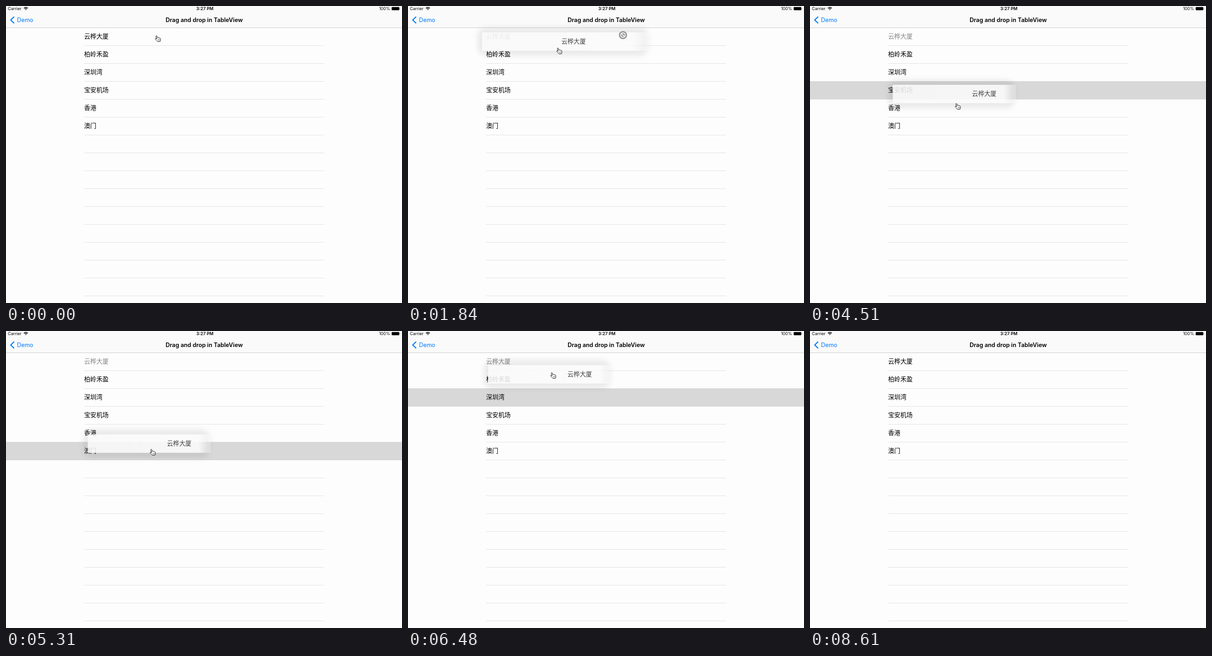
An HTML page for the animation above (8880 ms loop, 864 by 648 pixels).

```html
<!DOCTYPE html>
<html lang="zh-CN">
<head>
<meta charset="utf-8">
<title>Drag and drop in TableView</title>
<style>
  html, body { margin: 0; width: 100%; height: 100%; overflow: hidden; background: #fdfdfd; }
  svg { display: block; width: 864px; height: 648px; }
  text { font-family: Inter, sans-serif; font-size: 12.75px; }
  .status { font-size: 9.1px; }
  .cell { font-family: 'Noto Sans CJK SC', 'Noto Sans CJK', sans-serif; font-size: 13.33px; }
</style>
</head>
<body>
<svg viewBox="0 0 864 648">
  <defs>
    <linearGradient id="fade">
      <stop offset="0" stop-color="#fcfcfc" stop-opacity=".86"/>
      <stop offset=".9" stop-color="#fefefe" stop-opacity=".86"/>
      <stop offset="1" stop-color="#fefefe" stop-opacity=".25"/>
    </linearGradient>
    <filter id="blur" x="-40" y="-40" width="800" height="120" filterUnits="userSpaceOnUse">
      <feGaussianBlur stdDeviation="6"/>
    </filter>
  </defs>

  <rect width="864" height="47" fill="#fafafa"/>
  <rect y="47" width="864" height="1" fill="#cbcbcb"/>
  <text class="status" x="4" y="9">Carrier</text>
  <g fill="none" stroke="#000" stroke-width="1.4">
    <path d="M38.9 4.8a6.2 6.2 0 0 1 8.8 0M40.7 6.5a3.7 3.7 0 0 1 5.2 0"/>
    <path d="M43.3 9.2l-1.2-1.4a1.8 1.8 0 0 1 2.4 0z" fill="#000" stroke="none"/>
  </g>
  <text class="status" x="434" y="9" text-anchor="middle" font-weight="600" style="font-size:9.4px">3:27 PM</text>
  <text class="status" x="838" y="9" text-anchor="end">100%</text>
  <rect x="841.5" y="2.3" width="16.6" height="7" rx="1.4"/>
  <path d="M859 4.4q1.3 1.4 0 2.8z"/>
  <path d="M17.8 23.2L10.4 30.5l7.4 7.3" fill="none" stroke="#007aff" stroke-width="2.3"/>
  <text x="24" y="35" fill="#007aff">Demo</text>
  <text x="432.5" y="35" text-anchor="middle" font-weight="600">Drag and drop in TableView</text>

  <g id="lines" fill="#e1e1e1"></g>
  <rect id="mark" width="864" height="40" fill="#d8d8d8"/>
  <g id="cells"></g>

  <g id="card">
    <rect id="shade" x="-10" y="-11" height="62" rx="20" fill-opacity=".075" filter="url(#blur)"/>
    <rect id="plate" height="40" fill="url(#fade)"/>
    <text id="label" class="cell" y="24.5" fill="#444"></text>
  </g>
  <g id="badge">
    <circle r="9" fill="#9a9a9a"/>
    <g fill="none" stroke="#fff" stroke-width="1.6">
      <circle r="5"/>
      <path d="M-3.5-3.5L3.5 3.5"/>
    </g>
  </g>
  <g id="hand" stroke="#000" stroke-linejoin="round">
    <path fill="#fff" d="M-1.9 1L-3.9-4.3C-4.5-6.4-2.3-6.9-1.7-5.2L-.4-1.6C.4-2.6 1.8-2.4 2.1-1.4 3-2.2 4.2-1.8 4.4-.7 5.4-1 6-.1 6.1 1 6.3 3 5.9 4 5.3 6.3L-.2 6.6C-1.4 4.8-3 3.8-4.8 1.6-6-.1-4.2-.9-3.2 0z"/>
    <path d="M.8 1.8V4M2.4 1.7V4M4 1.6V4" stroke-width=".6"/>
  </g>
</svg>
<script>
const LOOP = 8880, TICK = 89.07, FIRST = 950, ROW = 39, TOP = 47;
const CARD_LAG = 75, MARK_LAG = 200;
const names = ['云桦大厦', '柏岭禾盈', '深圳湾', '宝安机场', '香港', '澳门'];
const $ = id => document.getElementById(id);

function add(parent, tag, attrs, text = '') {
  const el = document.createElementNS('http://www.w3.org/2000/svg', tag);
  for (const k in attrs) el.setAttribute(k, attrs[k]);
  el.textContent = text;
  return parent.appendChild(el);
}
for (let i = 1; i <= 15; i++)
  add($('lines'), 'rect', { x: 170.5, y: TOP + i * ROW, width: 523.5, height: 1 });
const cells = names.map((name, i) =>
  add($('cells'), 'text', { class: 'cell', x: 170.5, y: TOP + i * ROW + 24.4 }, name));
$('label').textContent = names[0];

const lerp = (a, b, p) => a + (b - a) * p;
const clamp = p => Math.min(1, Math.max(0, p));
// Eased 0 to 1 between two times.
function ramp(t, from, to) {
  const p = clamp((t - from) / (to - from));
  return p * p * (3 - 2 * p);
}
// Rises over one span and falls over another.
const pulse = (t, a, b, c, d) => ramp(t, a, b) - ramp(t, c, d);

// Vertical strokes of the hand: start, end, height reached.
const strokes = [
  [1390, 2200, 117], [2500, 2980, 157], [3440, 3890, 186], [4250, 4690, 237],
  [4950, 5350, 265], [5570, 6640, 85], [7600, 8450, 622]
];
const handY = t => strokes.reduce((y, [from, to, end]) => lerp(y, end, ramp(t, from, to)), 71);
const handX = t => 331 - 15 * clamp((t - 1390) / 5250) + 459 * ramp(t, 7600, 8450);

const set = (id, key, value) => $(id).setAttribute(key, value);
const move = (id, x, y) => set(id, 'transform', `translate(${x} ${y})`);

function draw(now) {
  let t = now % LOOP;
  if (t >= FIRST) t = FIRST + Math.floor((t - FIRST + 6) / TICK) * TICK;

  const x = handX(t), y = handY(t);
  move('hand', x, y);
  set('hand', 'opacity', t < 8480 ? 1 : 0);
  move('badge', x + 139.3, y - 34.5);
  set('badge', 'opacity', pulse(t, 1390, 1570, 2100, 2200) + pulse(t, 6750, 6920, 7100, 7280));

  // The lifted row shrinks to a small card that trails the hand.
  const back = [7100, 7550];
  const width = lerp(523, 269, pulse(t, 1210, 2290, ...back));
  const lift = pulse(t, 1210, 1480, ...back);
  const grip = lerp(168, 141.5, pulse(t, 1840, 2290, ...back));
  move('card', x - grip, lerp(TOP, handY(t - CARD_LAG) - 34, lift));
  set('card', 'opacity', pulse(t, 950, 1300, ...back));
  set('shade', 'opacity', lift);
  set('shade', 'width', width + 8);
  set('plate', 'width', width);
  set('label', 'x', lerp(8, 173, pulse(t, 1210, 1750, ...back)));

  const row = Math.floor((handY(t - MARK_LAG) - TOP) / ROW);
  const pressed = t >= 810 ? 1 - ramp(t, 950, 1210) : 0;
  set('mark', 'y', TOP + row * ROW);
  set('mark', 'opacity', row > 0 && t < back[0] ? 1 : pressed);

  const grey = Math.round(136 * pulse(t, 1210, 1390, 8160, 8600));
  cells[0].setAttribute('fill', `rgb(${grey},${grey},${grey})`);
}
const start = performance.now();
(function loop() {
  draw(performance.now() - start);
  requestAnimationFrame(loop);
})();
</script>
</body>
</html>
```
